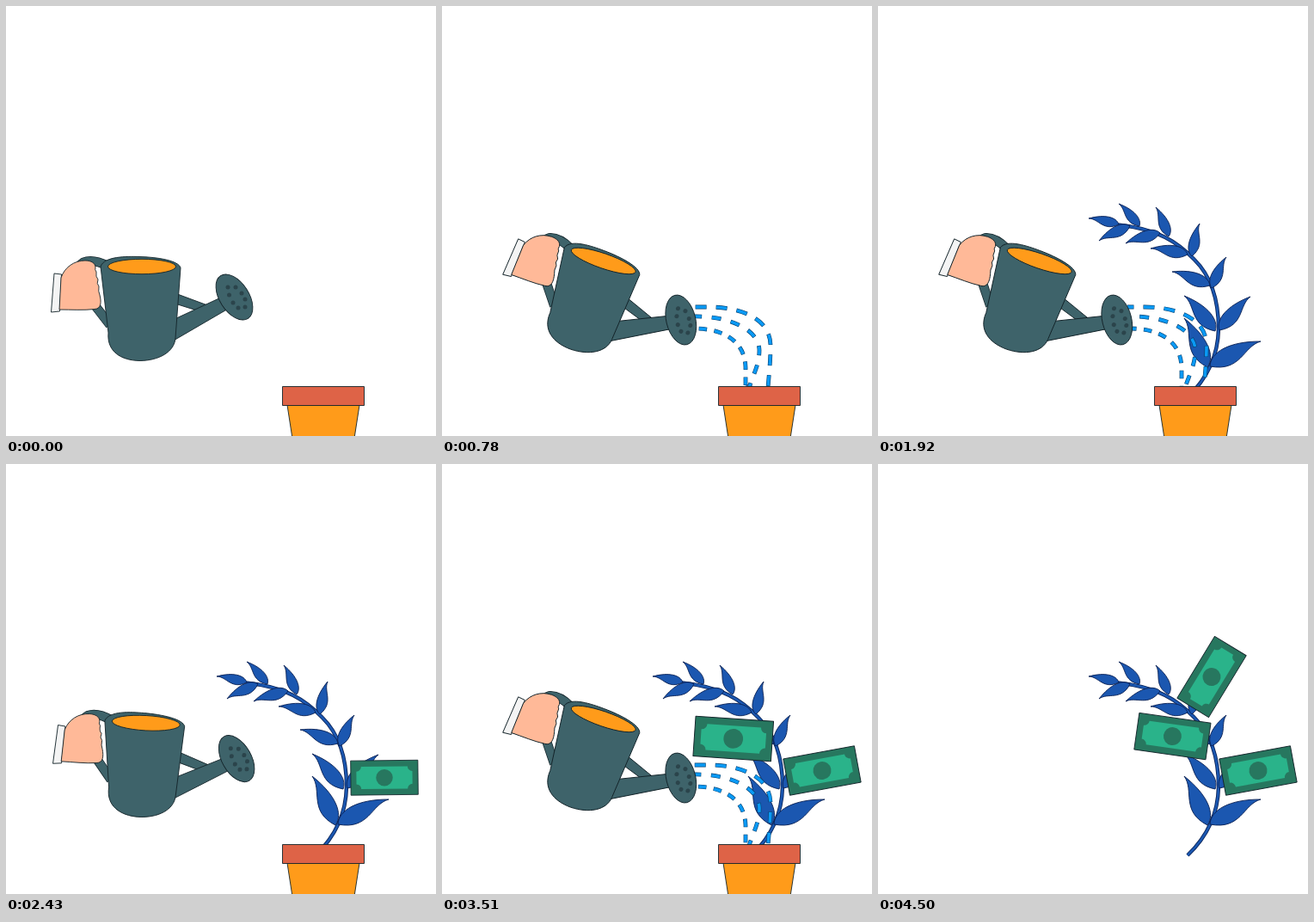
An HTML page for the animation above (4.53 s loop, 500x500 px).

```html
<!DOCTYPE html>
<html lang="en">
<head>
<meta charset="utf-8">
<title>Watering a money plant</title>
<style>
  html, body { margin: 0; width: 100%; height: 100%; overflow: hidden; background: #fff; }
  svg { display: block; width: 100vw; height: 100vh; }
  .line { stroke: #14242a; stroke-width: .9; stroke-linejoin: round; }
  .teal { fill: #3e636a; }
  .skin { fill: #ffb998; }
  .leaf { fill: #1b57b0; stroke: #081f52; stroke-width: .9; }
  .none { fill: none; }
</style>
</head>
<body>
<svg viewBox="0 0 500 500">
  <defs>
    <g id="bill">
      <rect x="-42" y="-21.5" width="84" height="43" fill="#27775f" class="line"/>
      <path fill="#2ab38a" d="M-29 -14H29A6 6 0 0 0 35 -8V8A6 6 0 0 0 29 14H-29A6 6 0 0 0 -35 8V-8A6 6 0 0 0 -29 -14Z"/>
      <circle r="10.5" fill="#27775f"/>
    </g>
    <path id="grip" d="M118 302C106 296 97 295 90 298C78 306 84 326 104 349L121 371"/>
    <path id="stem" d="M360 455C384 432 395.500 404 396 375C396 338 385 312 368 295C349 275 326 259 279 254.500"/>
  </defs>

  <g id="plant">
    <g class="none">
      <use href="#stem" stroke="#081f52" stroke-width="4.400"/>
      <use href="#stem" stroke="#1b57b0" stroke-width="2.800"/>
    </g>
  </g>
  <g id="bills"></g>
  <g id="water" class="none"></g>

  <g id="pot" class="line">
    <path fill="#ff9b1a" d="M327 464H411L404.500 506H333.500Z"/>
    <path fill="#de6347" d="M321.500 442.500H416.500V464.500H321.500Z"/>
  </g>

  <g id="can">
    <g class="none">
      <use href="#grip" stroke="#14242a" stroke-width="11"/>
      <use href="#grip" stroke="#3e636a" stroke-width="9.500"/>
    </g>
    <g class="line teal">
      <path d="M198 334.500L233 347.500L222 354L198 346.500Z"/>
      <path d="M195 364.500L253 337.500L261 350.500L194 389.500Z"/>
      <path d="M110 303C114 291 140 291 155 291.500C176 292 201 296 203 304.500L197 386C196 402 178 412.500 155 412.500C134 412 117 402 119 380Z"/>
      <ellipse rx="17" ry="29.500" transform="translate(265.500 338.500) rotate(-32.700)"/>
    </g>
    <ellipse cx="158" cy="303" rx="39.500" ry="8.700" fill="#ff9b1a" class="line"/>
    <g id="holes" fill="#2b444b"></g>
    <path fill="#f4f4f4" class="line" d="M56 311L64.500 312L62.500 355L52.500 356Z"/>
    <path class="line skin" d="M62 353L64 316C68 304 79 296 92 296C99 296 104 299 104 304Q103 307 105 309Q104 315 107 318Q105 323 108 326Q107 332 109 336C111 344 111 352 103 352.500C90 354 76 353 62 353Z"/>
  </g>
</svg>
<script>
const LOOP = 4530, POUR_LEN = 1105, TILT_TIME = 350, CLEAR = 4500;
const POURS = [50, 1420, 2790];
const $ = id => document.getElementById(id);
const clamp = x => Math.max(0, Math.min(1, x));
const sine = x => (1 - Math.cos(Math.PI * clamp(x))) / 2;
const backOut = (x, c) => 1 + (c + 1) * (x - 1) ** 3 + c * (x - 1) ** 2;

function add(parent, tag, attrs) {
  const el = document.createElementNS('http://www.w3.org/2000/svg', tag);
  for (const k in attrs) el.setAttribute(k, attrs[k]);
  return parent.appendChild(el);
}

function show(el, on) {
  el.setAttribute('visibility', on ? 'visible' : 'hidden');
}

// Leaf from base to tip with a curled point; side 1 leans right, -1 left
function leaf(x, y, tx, ty, side) {
  const dx = tx - x, dy = ty - y;
  const p = (u, v) => `${(x + u * dx - v * side * dy).toFixed(1)} ${(y + u * dy + v * side * dx).toFixed(1)} `;
  const d = 'M' + p(0, 0) + 'C' + p(.12, -.22) + p(.5, -.25) + p(1, 0)
    + 'C' + p(.68, -.06) + p(.45, .34) + p(0, 0) + 'Z';
  add($('plant'), 'path', { d, class: 'leaf' });
}
[
  [386, 419, 445, 390, 1], [383, 420, 356, 363, -1],
  [397, 377, 433, 338, 1], [392, 378, 356, 337, -1],
  [388, 328, 405, 292, 1], [386, 325, 342, 309, -1],
  [365, 291, 374, 253, 1], [360, 289, 317, 282, -1],
  [338, 268, 323, 234, -1], [328, 264, 288, 276, -1],
  [304, 256, 280, 230, -1], [293, 256, 257, 273, -1],
  [280, 254, 245, 247, -1]
].forEach(a => leaf(...a));

[[258, 327], [267, 327], [274, 334], [259.5, 336], [278, 341], [264, 345], [270, 351], [278, 350]]
  .forEach(([cx, cy]) => add($('holes'), 'circle', { cx, cy, r: 2.5 }));

// Each bill grows from a point on the stem
const bills = [
  { x: 396, y: 368, cx: 47.3, cy: -3, from: 3, to: -10.4, start: 2306, c: 2.2 },
  { x: 384, y: 322.5, cx: -42, cy: 0, from: 0, to: 8.1, start: 3290, c: 1.7 },
  { x: 388, y: 295, cx: 40.6, cy: -24.7, from: -61, to: -58.7, start: 3881, c: 1.3 }
];
bills.forEach(b => {
  b.el = add($('bills'), 'g', {});
  add(b.el, 'use', { href: '#bill', x: b.cx, y: b.cy });
});

const streams = [
  { d: 'M290 350H310C345 350 382 362 382 395C382 415 380 430 379 444', dash: 12, period: 24, phase: 5 },
  { d: 'M292 361C332 360 368 375 369 400C369 417 362 428 357 444', dash: 10, period: 22.5, phase: 22 },
  { d: 'M293 375C325 375 352 388 353 420V444', dash: 8.5, period: 18, phase: 6 }
];
streams.forEach(s => {
  s.edge = add($('water'), 'path', { d: s.d, stroke: '#06406e', 'stroke-width': 4.8 });
  s.fill = add($('water'), 'path', { d: s.d, stroke: '#0a9af5', 'stroke-width': 3.6 });
  s.len = s.edge.getTotalLength();
});

// Dash pattern limited to the stretch from a to b
function dashes(s, shift, a, b, grow) {
  const out = [];
  let at = 0;
  for (let p = (s.phase + shift) % s.period - s.period; p < b; p += s.period) {
    const from = Math.max(p - grow, a), to = Math.min(p + s.dash + grow, b);
    if (to <= from) continue;
    if (!out.length) out.push(0);
    out.push(from - at, to - from);
    at = to;
  }
  if (!out.length) out.push(0);
  out.push(999);
  return out.map(n => n.toFixed(2)).join(' ');
}

function draw(t) {
  const start = POURS.filter(p => p <= t).pop() ?? POURS[0];
  const rel = t - start;
  for (const id of ['can', 'pot']) show($(id), t < CLEAR);

  const tilt = sine(rel / TILT_TIME) - sine((rel - POUR_LEN + TILT_TIME) / TILT_TIME);
  $('can').setAttribute('transform', `rotate(${19 * tilt} 192.4 388.5)`);

  const head = clamp((rel - 150) / 140), tail = clamp((rel - 760) / 140);
  const cycles = (t - 780) / 249 + 4;
  show($('water'), head > tail && t < CLEAR);
  for (const s of streams) {
    const shift = cycles * s.period, a = tail * s.len, b = head * s.len;
    s.edge.setAttribute('stroke-dasharray', dashes(s, shift, a, b, .5));
    s.fill.setAttribute('stroke-dasharray', dashes(s, shift, a, b, 0));
  }

  const size = sine((t - 618) / 954);
  show($('plant'), size > 0);
  $('plant').setAttribute('transform', `translate(360 455) scale(${size}) translate(-360 -455)`);

  for (const b of bills) {
    const x = clamp((t - b.start) / 460);
    show(b.el, x > 0);
    b.el.setAttribute('transform',
      `translate(${b.x} ${b.y}) rotate(${b.from + (b.to - b.from) * x}) scale(${backOut(x, b.c)})`);
  }
}

const began = performance.now();
function tick() {
  draw((performance.now() - began) % LOOP);
  requestAnimationFrame(tick);
}
draw(0);
requestAnimationFrame(tick);
</script>
</body>
</html>
```
